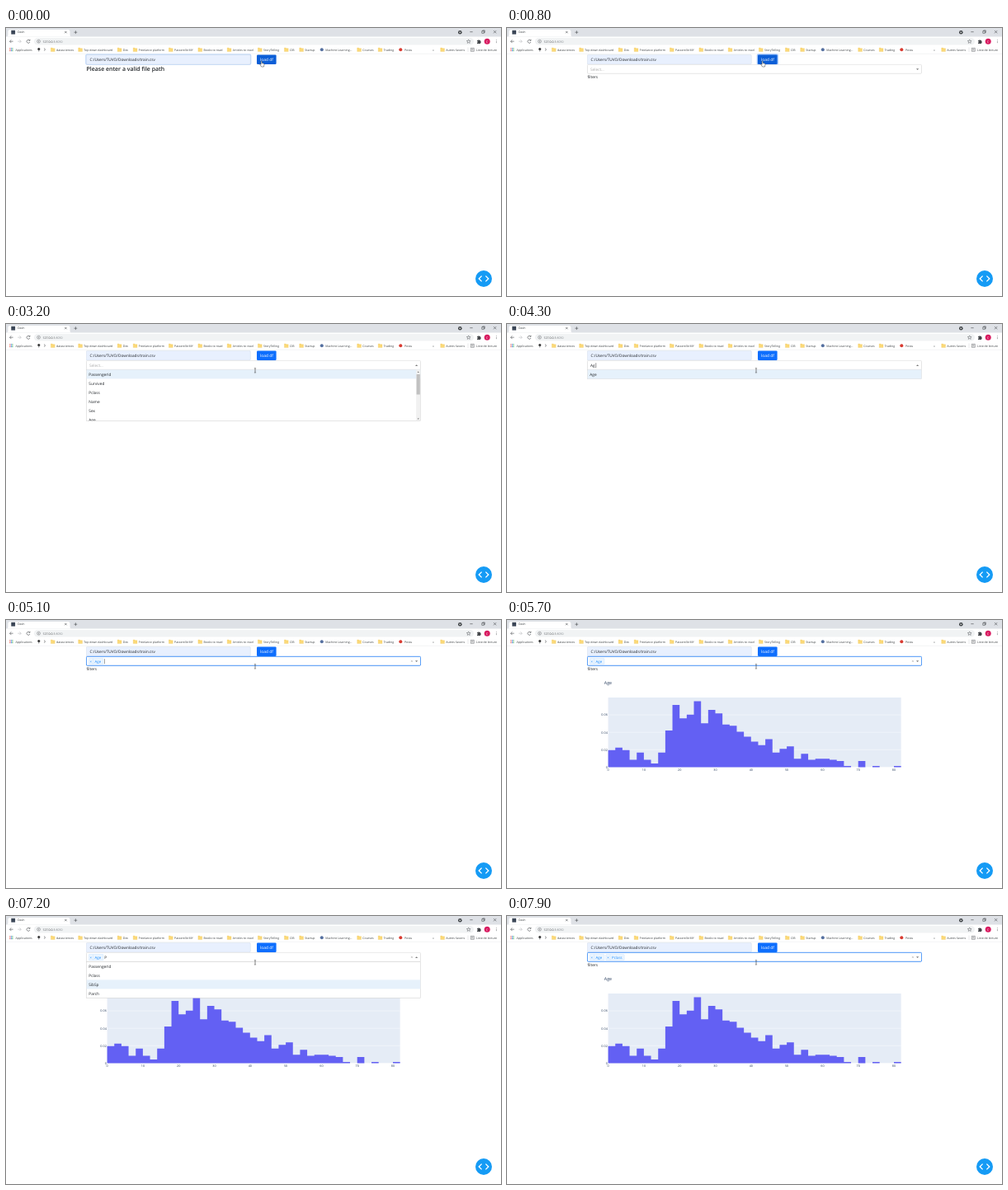
Animation, 600 px wide and 325 px high, one loop 8 s. Source, as an HTML page:

```html
<!DOCTYPE html>
<html lang="en">
<head>
<meta charset="utf-8">
<title>Dash</title>
<style>
html, body { margin: 0; width: 100%; height: 100%; overflow: hidden; background: #fff; }
svg { display: block; width: 600px; height: 325px; }
text { font: 4.75px "Open Sans", "Noto Sans", sans-serif; fill: #212529; text-rendering: geometricPrecision; white-space: pre; }
.small text, text.small { font-size: 3.55px; fill: #3c4043; }
.line { fill: none; stroke: #45484c; stroke-width: .6; }
.blue text { font-size: 4.4px; fill: #1a8bff; }
.tick text { font-size: 3.75px; fill: #2a3f5f; }

/* Everything runs on one 8 s clock; boundaries sit just before each 100 ms step. */
.t { opacity: 0; animation: 8s step-end infinite; }
#prompt { animation-name: prompt; }
#inputFocus { animation-name: inputFocus; }
#btnFocus { animation-name: btnFocus; }
#idle, #idle2 { animation-name: idle; }
#busy { animation-name: busy; }
#picker { animation-name: picker; }
#filters { animation-name: filters; }
#ring { animation-name: ring; }
#hint { animation-name: hint; }
#open { animation-name: open; }
#closed { animation-name: closed; }
#all { animation-name: all; }
#listA { animation-name: typeA; }
#listAg { animation-name: typeAg; }
#listP { animation-name: typeP; }
#focusSib { animation-name: focusSib; }
#focusPc { animation-name: focusPc; }
#tagAge { animation-name: tagAge; }
#tagPc { animation-name: tagPc; }
#chart { animation-name: chart; }
#caret0 { animation-name: caret0; }
#caretA { animation-name: typeA; }
#caretAg { animation-name: caretAg; }
#caretTag { animation-name: caretTag; }
#hand { animation-name: hand; }
#beam { animation-name: beam; }
#btn { animation: btn 8s linear infinite; }
#pointer { animation: pointer 8s linear infinite; }

@keyframes prompt { 0% { opacity: 1 } 6.2% { opacity: 0 } }
@keyframes inputFocus { 0% { opacity: 1 } 1.2% { opacity: 0 } }
@keyframes btnFocus { 0% { opacity: 0 } 1.2% { opacity: 1 } 21.2% { opacity: 0 } }
@keyframes idle { 0% { opacity: 1 } 2.45% { opacity: 0 } 7.45%, 100% { opacity: 1 } }
@keyframes busy { 0% { opacity: 0 } 2.45% { opacity: 1 } 7.45% { opacity: 0 } }
@keyframes picker { 0% { opacity: 0 } 6.2%, 100% { opacity: 1 } }
@keyframes filters { 0% { opacity: 0 } 6.2% { opacity: 1 } 19.9% { opacity: 0 } 59.9% { opacity: 1 } 88.7% { opacity: 0 } 97.4%, 100% { opacity: 1 } }
@keyframes ring { 0% { opacity: 0 } 59.9% { opacity: 1 } 88.7% { opacity: 0 } 97.4%, 100% { opacity: 1 } }
@keyframes hint { 0% { opacity: 1 } 46.2% { opacity: 0 } }
@keyframes open { 0% { opacity: 0 } 19.9% { opacity: 1 } 59.9% { opacity: 0 } 88.7% { opacity: 1 } 97.4% { opacity: 0 } }
@keyframes closed { 0% { opacity: 1 } 19.9% { opacity: 0 } 59.9% { opacity: 1 } 88.7% { opacity: 0 } 97.4%, 100% { opacity: 1 } }
@keyframes all { 0% { opacity: 0 } 19.9% { opacity: 1 } 46.2% { opacity: 0 } }
@keyframes typeA { 0% { opacity: 0 } 46.2% { opacity: 1 } 49.9% { opacity: 0 } }
@keyframes typeAg { 0% { opacity: 0 } 49.9% { opacity: 1 } 59.9% { opacity: 0 } }
@keyframes typeP { 0% { opacity: 0 } 88.7% { opacity: 1 } 97.4% { opacity: 0 } }
@keyframes focusSib { 0% { opacity: 1 } 93.7% { opacity: 0 } }
@keyframes focusPc { 0% { opacity: 0 } 93.7%, 100% { opacity: 1 } }
@keyframes tagAge { 0% { opacity: 0 } 59.9%, 100% { opacity: 1 } }
@keyframes tagPc { 0% { opacity: 0 } 97.4%, 100% { opacity: 1 } }
@keyframes chart { 0% { opacity: 0 } 71.2%, 100% { opacity: 1 } }
@keyframes caret0 { 0% { opacity: 0 } 19.9% { opacity: 1 } 27.4% { opacity: 0 } 33.7% { opacity: 1 } 39.9% { opacity: 0 } }
@keyframes caretAg { 0% { opacity: 0 } 49.9% { opacity: 1 } 57.4% { opacity: 0 } }
@keyframes caretTag { 0% { opacity: 0 } 59.9% { opacity: 1 } 71.2% { opacity: 0 } 77.4% { opacity: 1 } 83.7% { opacity: 0 } }
@keyframes hand { 0% { opacity: 1 } 14.5% { opacity: 0 } }
@keyframes beam { 0% { opacity: 0 } 14.5%, 100% { opacity: 1 } }
@keyframes btn { 0%, 21.2% { fill: #0b5ed7 } 22.5%, 100% { fill: #0d6efd } }
@keyframes pointer {
  0%, 12.5% { transform: translate(310px, 43px); animation-timing-function: ease-in-out }
  18.7%, 26.2% { transform: translate(303px, 50.5px) }
  28.7%, 100% { transform: translate(302px, 56.3px) }
}
</style>
</head>
<body>
<svg viewBox="0 0 600 325">
  <defs>
    <clipPath id="listClip"><rect x="97" y="55" width="406" height="62.2"/></clipPath>
  </defs>

  <!-- Browser window -->
  <rect width="600" height="10.5" fill="#dee1e6"/>
  <path d="M1 10.5Q2.5 10.5 2.5 8V4.2Q2.5 2 5 2H75Q77.500 2 77.500 4.200V8Q77.500 10.500 79 10.500Z" fill="#fff"/>
  <rect x="6.300" y="2.800" width="4.800" height="4.800" fill="#3b4656"/>
  <g class="small">
    <text id="idle" class="t" x="14" y="6.400">Dash</text>
    <text id="busy" class="t" x="14" y="6.400">Updating...</text>
  </g>
  <path class="line" d="M71.200 3.900l2.400 2.400m0-2.400l-2.400 2.400M82.500 5.200h3.800m-1.900-1.900v3.800"/>
  <circle cx="550.300" cy="5.300" r="2.300" fill="#3c4043"/>
  <path d="M549 4.700h2.600l-1.300 1.500z" fill="#fff"/>
  <path class="line" d="M562.300 4.700h3.400M576.800 3.700h2.600v2.600h-2.600zM577.700 3.700v-.8h2.600v2.600h-.9M591 3.100l3.200 3.200m0-3.200l-3.200 3.200"/>
  <rect x="34" y="12" width="533" height="8.600" rx="4.300" fill="#f1f3f4"/>
  <path class="line" d="M8.600 16.200H4.600m1.800-1.900l-1.900 1.900 1.900 1.900M28.700 15a2 2 0 1 0 .3 2M29 13.800v1.500h-1.500"/>
  <path class="line" d="M14.200 16.200h4m-1.800-1.900l1.900 1.900-1.900 1.900" style="stroke:#babcbe"/>
  <circle class="line" cx="39.600" cy="16.200" r="1.900" style="stroke-width:.4"/>
  <path class="line" d="M39.600 15.900v1.300m0-2.200v.4" style="stroke-width:.5"/>
  <text class="small" x="44.500" y="17.700">127.0.0.1:<tspan fill="#80868b">8050</tspan></text>
  <path class="line" style="stroke-width:.45" d="M560.700 13.900l.7 1.600 1.700.1-1.300 1.100.4 1.700-1.500-.9-1.500.9.400-1.700-1.300-1.100 1.700-.1z"/>
  <path d="M571 15h1.300a.8.800 0 0 1 1.600 0h1.200v1.300a.8.800 0 0 1 0 1.600v1H571v-1.200a.8.800 0 0 0 0-1.600z" fill="#45484c"/>
  <circle cx="583.200" cy="16.200" r="3.500" fill="#d81b60"/>
  <text x="583.200" y="17.500" text-anchor="middle" style="font-size:3.500px;fill:#fff">C</text>
  <g fill="#45484c"><circle cx="594.300" cy="14.600" r=".45"/><circle cx="594.300" cy="16.200" r=".45"/><circle cx="594.300" cy="17.800" r=".45"/></g>
  <g id="marks" class="small"></g>
  <path d="M0 31.300H600" stroke="#e4e6e9" stroke-width=".4"/>

  <!-- File form -->
  <rect id="inputFocus" class="t" x="96.300" y="31.600" width="201" height="13.100" rx="1.900" fill="#b9d5fc"/>
  <rect x="97.300" y="32.400" width="199" height="11.600" rx="1.200" fill="#e8f0fe" stroke="#c9d3e0" stroke-width=".4"/>
  <text x="101.400" y="40">C:/Users/TUVO/Downloads/train.csv</text>
  <rect id="btnFocus" class="t" x="302.700" y="31.200" width="26.200" height="13.900" rx="2" fill="#a5c8fd"/>
  <rect id="btn" x="304" y="32.400" width="23.600" height="11.600" rx="1.200"/>
  <text x="308" y="39.900" style="font-size:4.900px;fill:#fff">load df</text>
  <text id="prompt" class="t" x="97.600" y="51.500" style="font-size:6.950px;font-weight:600">Please enter a valid file path</text>

  <!-- Histogram -->
  <g id="chart" class="t"></g>
  <text id="filters" class="t" x="97.500" y="61">filters</text>

  <!-- Column picker -->
  <g id="picker" class="t">
    <rect x="97.500" y="44.300" width="405" height="11" rx="1.200" fill="#fff" stroke="#ccc" stroke-width=".5"/>
    <rect id="ring" class="t" x="97.400" y="44.300" width="405.200" height="11" rx="1.200" fill="none" stroke="#2684ff" stroke-width=".8"/>
    <text id="hint" class="t" x="101" y="51.700" style="fill:#aaa">Select...</text>
    <path id="closed" class="t" d="M496 49.300h3.200l-1.600 1.700z" fill="#777"/>
    <path id="open" class="t" d="M496 51h3.200l-1.600-1.700z" fill="#777"/>
    <g id="tagAge" class="t blue"></g>
    <g id="tagPc" class="t blue"></g>
    <g id="all" class="t"></g>
    <g id="listA" class="t"></g>
    <g id="listAg" class="t"></g>
    <g id="listP" class="t"></g>
    <g fill="none" stroke="#333" stroke-width=".5">
      <path id="caret0" class="t" d="M101 47.200v6"/>
      <path id="caretA" class="t" d="M104.600 47.200v6"/>
      <path id="caretAg" class="t" d="M107.800 47.200v6"/>
      <path id="caretTag" class="t" d="M119.400 47.200v6"/>
    </g>
  </g>

  <!-- Developer tools button -->
  <circle cx="579" cy="304" r="10" fill="#159bf5"/>
  <path d="M576.600 300.600l-3.400 3.400 3.400 3.400M581.400 300.600l3.400 3.400-3.400 3.400" fill="none" stroke="#fff" stroke-width="1.300"/>

  <g id="pointer">
    <path id="hand" class="t" d="M-.9-2.500q.7-.8 1.200 0V-.4l2.100.5q.7.300.6 1.100L2.500 4H-.4L-2.200 1.400q-.2-.8.600-.6l.7.600z" fill="#fff" stroke="#222" stroke-width=".45"/>
    <path id="beam" class="t" d="M-1.100-2.600H-.3L0-2.300.3-2.600H1.100M0-2.300V2.300M-1.100 2.600H-.3L0 2.300.3 2.600H1.100" fill="none" stroke="#222" stroke-width=".55"/>
  </g>
</svg>

<script>
const put = (id, html) => { document.getElementById(id).innerHTML = html; };
const label = (x, y, s, more = '') => `<text x="${x}" y="${y}" ${more}>${s}</text>`;
const box = (x, y, w, h, fill, more = '') =>
  `<rect x="${x}" y="${y}" width="${w}" height="${h}" fill="${fill}" ${more}/>`;

// Bookmarks bar
const folders = [
  [61, 'datasciences'], [94.3, 'Top down dashboard'], [141.8, 'Dev'], [160.8, 'Freelance platform'],
  [204, 'Passerelle MY'], [239.5, 'Books to read'], [274.8, 'Articles to read'], [312, 'StoryTelling'],
  [344, 'CIB'], [362.3, 'Startup'], [432.3, 'Courses'], [457.8, 'Trading'], [533.3, 'Autres favoris']
];
const folder = x =>
  `<path d="M${x - 6.6} 24h1.800l.6.700h2.400v3.900h-4.800z" fill="#fbd978" stroke="#e9bd4d" stroke-width=".25"/>`;
let marks = folders.map(([x, s]) => folder(x) + label(x, 27.6, s)).join('');
for (let i = 0; i < 9; i++) {
  const hue = ['#ea4335', '#4285f4', '#34a853'][i % 3];
  marks += box(4.4 + i % 3 * 1.5, 24.2 + Math.floor(i / 3) * 1.5, 1, 1, hue);
}
marks += label(11.6, 27.6, 'Applications')
  + '<circle cx="39.800" cy="25.600" r="1.500" fill="#333"/><path class="line" d="M39.800 26v2.600M46 24.600l1.700 1.500-1.700 1.500"/>'
  + '<circle cx="382.800" cy="26.300" r="2" fill="#5570a0"/>' + label(387.2, 27.6, 'Machine Learning...')
  + '<circle cx="478.300" cy="26.300" r="2" fill="#d93c32"/>' + label(482.9, 27.6, 'Postu')
  + label(517, 27.6, '»') + '<path d="M560 23.500v5.500" stroke="#c4c7cb" stroke-width=".4"/>'
  + '<path class="line" d="M563.300 24.300h4v4h-4zM564.200 25.600h2.200m-2.200 1.300h2.200" style="stroke-width:.45"/>'
  + label(570, 27.6, 'Liste de lecture');
put('marks', marks);

// Option lists
const ROW = 11, TOP = 55.4;
const focusRow = (i, more = '') => box(97.7, TOP + i * ROW, 404.6, ROW, '#e6f1fb', more);
function list(names, focus, scroll) {
  const h = scroll ? 62 : names.length * ROW;
  const rows = names.map((s, i) => label(100.3, TOP + i * ROW + 7.4, s)).join('');
  const bar = box(497.2, TOP, 5, 61.8, '#f1f1f1') + box(497.6, 61, 4.2, 24.5, '#c1c1c1')
    + '<path d="M498.700 58.800h2l-1-1.200zM498.700 114.500h2l-1 1.200z" fill="#505050"/>';
  return box(97.5, TOP, 405, h, '#fff', 'stroke="#ccc" stroke-width=".5"')
    + `<g clip-path="url(#listClip)">${focus}${rows}${scroll ? bar : ''}</g>`;
}
const typed = (x, s) => label(x, 51.7, s);
const clear = '<path class="line" d="M490.900 48.900l2 2m0-2l-2 2" style="stroke:#888;stroke-width:.4"/>';

put('all', list(['PassengerId', 'Survived', 'Pclass', 'Name', 'Sex', 'Age'], focusRow(0), true));
put('listA', list(['PassengerId', 'Name', 'Age', 'Parch', 'Fare', 'Cabin'], focusRow(0), true) + typed(101, 'A'));
put('listAg', list(['Age'], focusRow(0)) + typed(101, 'Ag'));
put('listP', list(['PassengerId', 'Pclass', 'SibSp', 'Parch'],
  focusRow(2, 'id="focusSib" class="t"') + focusRow(1, 'id="focusPc" class="t"')) + typed(119.3, 'P'));

// Selected values
const tag = (x, w, s) => box(x, 46.5, w, 7.2, '#ebf5ff', 'rx=".6" stroke="#c2e0ff" stroke-width=".4"')
  + `<path d="M${x + 5.300} 46.500v7.200" stroke="#c2e0ff" stroke-width=".4"/>`
  + label(x + 1.4, 51.5, '×') + label(x + 7.3, 51.7, s);
put('tagAge', tag(100.2, 17.8, 'Age') + clear);
put('tagPc', tag(119.8, 22.4, 'Pclass'));

// Share of passengers per two-year age bin
const ages = [14, 16, 14, 6, 12, 6, 3, 12, 30, 51, 40, 43, 54, 36, 47, 44, 35, 34, 29, 25, 21,
  18, 23, 12, 15, 17, 7, 11, 6, 7, 7, 6, 5, 1, 0, 5, 0, 1, 0, 0, 1];
const X0 = 122.6, Y0 = 178.5, YEAR = 4.33, UNIT = 1057.5;
const total = ages.reduce((a, b) => a + b);
const outline = ages.map((n, i) => {
  const y = (Y0 - n / total * UNIT).toFixed(2);
  return `V${y}H${(X0 + (i + 1) * 2 * YEAR).toFixed(2)}`;
}).join('');
let chart = label(117.8, 78.3, 'Age', 'style="font-size:5.300px;fill:#2a3f5f"')
  + box(X0, 94, 82 * YEAR, Y0 - 94, '#e5ecf6') + '<g class="tick">';
for (const v of [0, .02, .04, .06]) {
  const y = Y0 - v * UNIT;
  chart += `<path d="M${X0} ${y}h${82 * YEAR}" stroke="#fff" stroke-width=".4"/>`
    + label(121.8, y + 1.3, v, 'text-anchor="end"');
}
for (let a = 0; a <= 80; a += 10) chart += label(X0 + a * YEAR, 182.6, a, 'text-anchor="middle"');
put('chart', chart + `</g><path d="M${X0} ${Y0}${outline}V${Y0}Z" fill="#6360f3"/>`);
</script>
</body>
</html>
```
